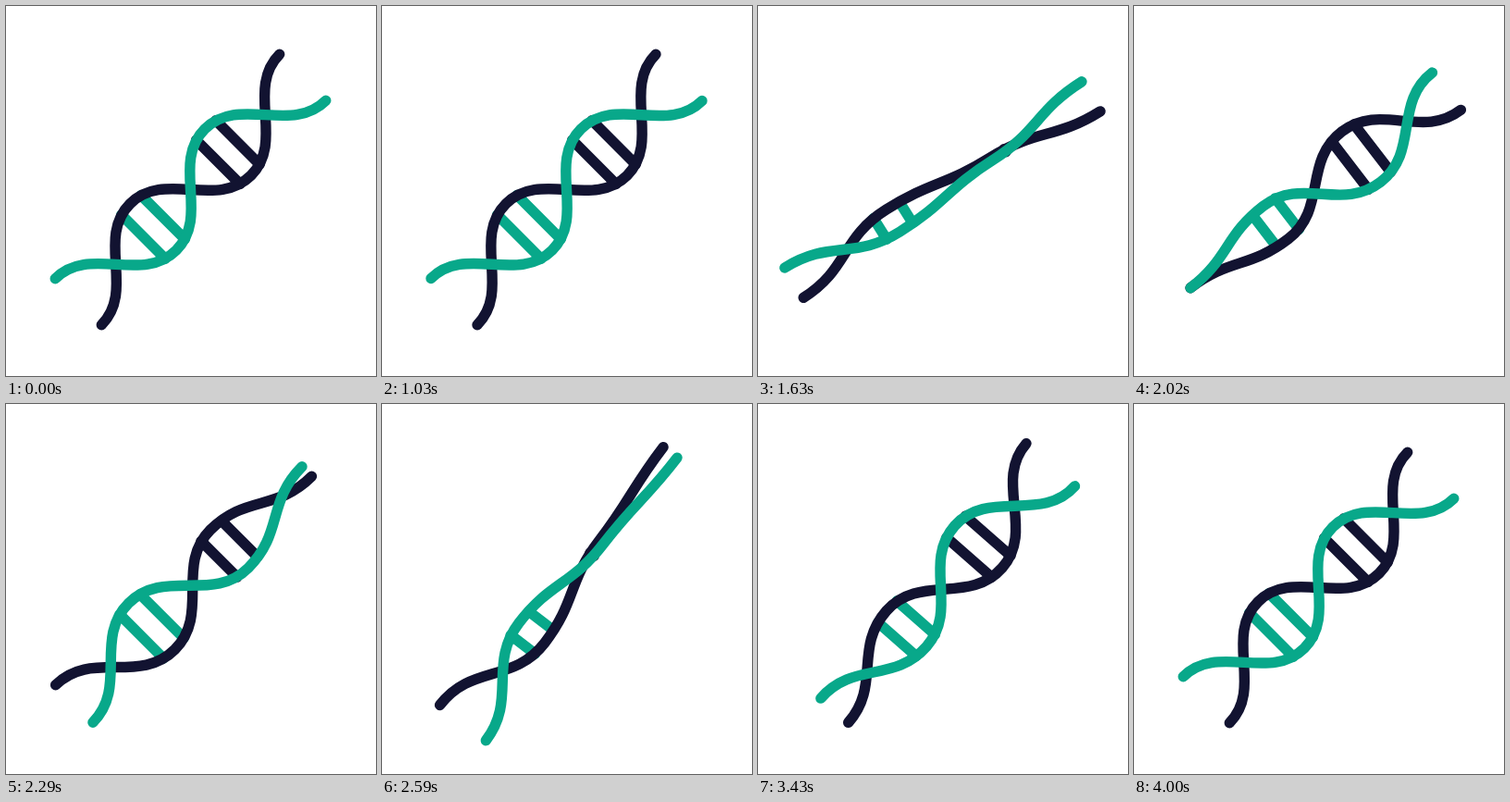
An HTML page for the animation above (4030 ms loop, 400 by 400 pixels).

```html
<!DOCTYPE html>
<html lang="en">
<head>
<meta charset="utf-8">
<title>DNA helix</title>
<style>
  html, body { margin: 0; height: 100%; overflow: hidden; background: #fff; }
  svg { display: block; width: 100vw; height: 100vh; }
  path { fill: none; stroke-width: 11.4; stroke-linecap: round; }
  .dark { stroke: #121331; }
  .teal { stroke: #08a88a; }
</style>
</head>
<body>
<svg viewBox="0 0 400 400">
  <g id="helix">
    <path id="upperRungs" class="dark"/>
    <path id="lowerRungs" class="teal"/>
    <path id="darkStrand" class="dark"/>
    <path id="tealStrand" class="teal"/>
  </g>
</svg>
<script>
const LOOP = 4030;
const TAU = 2 * Math.PI;
const STEP = 114.3;     // distance between neighbouring peaks
const HANDLE = 52;      // Bezier handle length at a peak
const AMP = 35.4;
const RUNG = 33.5;

const TIMES = [1000, 1630, 2020, 2590, 2980, 3400, 3700, 4000];
const ANGLE = [45, 32.1, 37.5, 52.5, 52.9, 49, 45.7, 45];
const STRETCH = [1, 1.105, 1.018, 1.074, 1.095, 1.035, 1.005, 1];
// Twist phase of each peak, from the upper right end to the lower left
const TWIST = [
  [0, 2.13, 3.91, 4.98, 5.69, 6.1, 6.25, TAU],
  [0, 1.62, 2.9, 4.63, 5.52, 6, 6.22, TAU],
  [0, 1.16, 2.25, 4.19, 4.89, 5.62, 6.08, TAU],
  [0, 1, 1.57, 3.62, 4.62, 5.25, 5.88, TAU]
];

const el = id => document.getElementById(id);

// Smooth curve through the key values, at rest on both ends
function sample(values, t) {
  const last = TIMES.length - 1;
  if (t <= TIMES[0]) return values[0];
  if (t >= TIMES[last]) return values[last];
  const i = TIMES.findIndex(x => x > t) - 1;
  const slope = k => k === 0 || k === last ? 0
    : (values[k + 1] - values[k - 1]) / (TIMES[k + 1] - TIMES[k - 1]);
  const d = TIMES[i + 1] - TIMES[i];
  const p = (t - TIMES[i]) / d, q = 1 - p;
  return values[i] * q * q * (1 + 2 * p) + values[i + 1] * p * p * (1 + 2 * q)
    + d * p * q * (slope(i) * q - slope(i + 1) * p);
}

function strand(peaks, stretch, side) {
  const x = i => (1.5 - i) * STEP * stretch;
  const y = i => side * AMP * (i % 2 ? 1 : -1) * peaks[i];
  const h = HANDLE * stretch;
  let d = `M${x(0)} ${y(0)}`;
  for (let i = 1; i < peaks.length; i++)
    d += `C${x(i - 1) - h} ${y(i - 1)} ${x(i) + h} ${y(i)} ${x(i)} ${y(i)}`;
  return d;
}

function rungs(centre, peak, stretch) {
  const r = RUNG * Math.abs(peak);
  return [-15, 15].map(o => `M${(centre + o) * stretch} ${-r}v${2 * r}`).join("");
}

function draw(now) {
  const t = now % LOOP;
  const stretch = sample(STRETCH, t);
  const peaks = TWIST.map(row => Math.cos(sample(row, t)));
  el("helix").setAttribute("transform",
    `translate(199.5 198.5) rotate(${-sample(ANGLE, t)})`);
  el("upperRungs").setAttribute("d", rungs(STEP / 2, peaks[1], stretch));
  el("lowerRungs").setAttribute("d", rungs(-STEP / 2, peaks[2], stretch));
  el("darkStrand").setAttribute("d", strand(peaks, stretch, 1));
  el("tealStrand").setAttribute("d", strand(peaks, stretch, -1));
  requestAnimationFrame(draw);
}
draw(performance.now());
</script>
</body>
</html>
```
